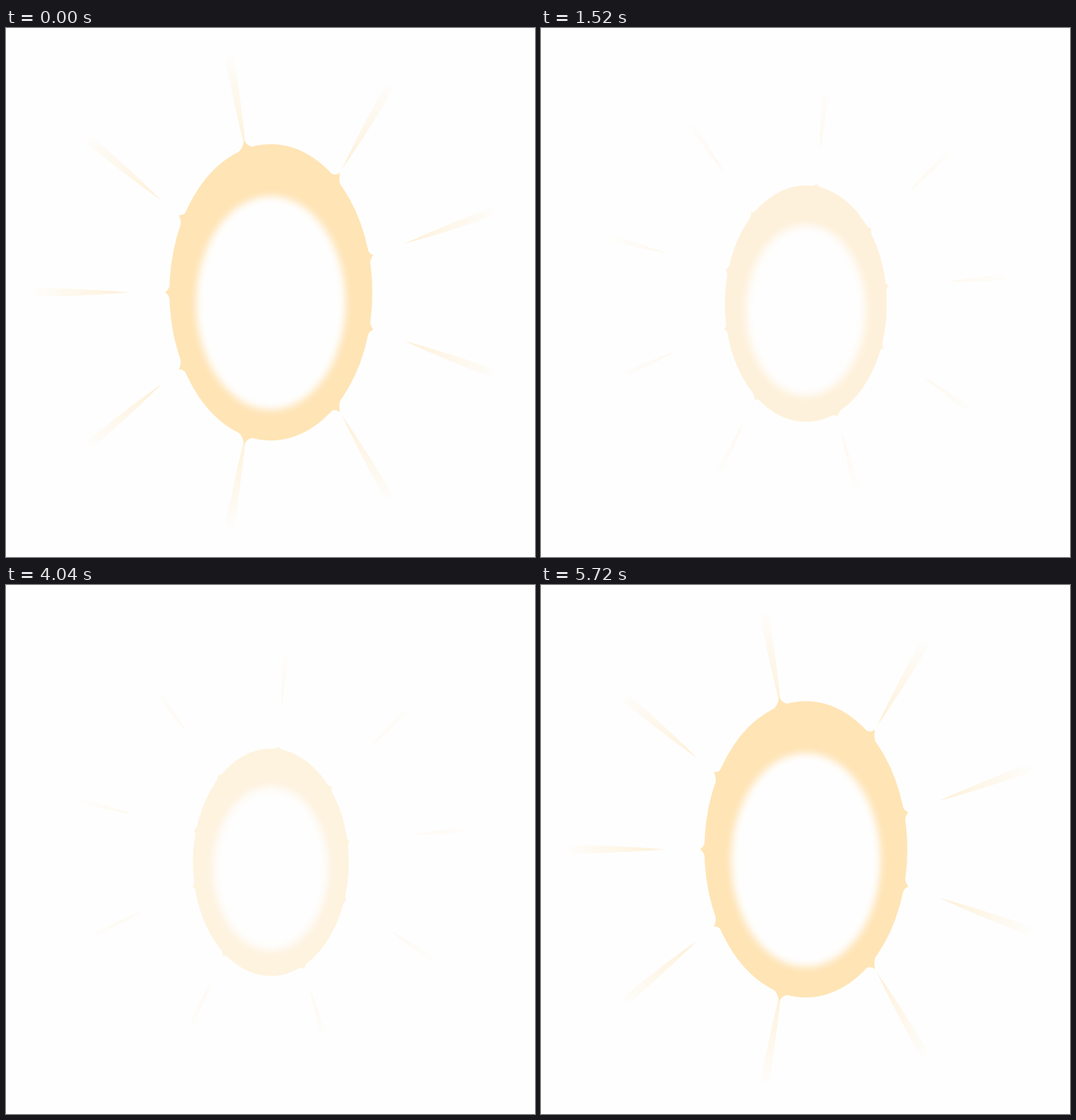
Animation, 748 px wide and 748 px high, one loop 5.76 s. Source, as an HTML page with a canvas:

```html
<!DOCTYPE html>
<html lang="en">
<head>
<meta charset="utf-8">
<title>Pulsing sun</title>
<style>
  html, body { margin: 0; width: 100%; height: 100%; overflow: hidden; background: #fefefe; }
  canvas { display: block; }
</style>
</head>
<body>
<canvas id="sun" width="748" height="748"></canvas>
<script>
const canvas = document.getElementById('sun');
const ctx = canvas.getContext('2d');

const STEP_MS = 40, LOOP_MS = 5760, LAST_STEP = 143;
const HOLD_START = 56, HOLD_END = 88;
const CX = 374.5, CY = 373.8, RAYS = 9;
const COLOR = '#ffe4b5';
const fade = alpha => `rgba(255, 228, 181, ${alpha})`;

function drawRay(angle, shrink) {
  const inner = 201 + 5 * shrink;
  const outer = 342 - 95 * shrink;
  const half = 5.5 - 3.4 * shrink;
  const bend = inner + 0.45 * (outer - inner);
  const gradient = ctx.createLinearGradient(inner, 0, outer, 0);
  [[0, 0.6], [0.25, 0.38], [0.6, 0.22], [0.85, 0.1], [1, 0]]
    .forEach(([at, alpha]) => gradient.addColorStop(at, fade(alpha)));

  ctx.save();
  ctx.translate(CX, CY);
  ctx.rotate(angle);
  ctx.beginPath();
  ctx.moveTo(inner, 0);
  ctx.quadraticCurveTo(bend, half, outer, half * 1.1);
  ctx.lineTo(outer, -half * 1.1);
  ctx.quadraticCurveTo(bend, -half, inner, 0);
  ctx.fillStyle = gradient;
  ctx.fill();
  ctx.restore();
}

// Distance from the ray centre to the ring's edge along a direction.
function edgeDistance(ux, uy, ring) {
  const dy = CY - ring.y;
  const a = (ux / ring.rx) ** 2 + (uy / ring.ry) ** 2;
  const b = uy * dy / ring.ry ** 2;
  const c = (dy / ring.ry) ** 2 - 1;
  return (-b + Math.sqrt(b * b - a * c)) / a;
}

// Pointed swelling where the ring is pulled towards a ray.
function drawBump(angle, shrink, ring) {
  const ux = Math.cos(angle), uy = Math.sin(angle);
  const edge = edgeDistance(ux, uy, ring);
  const x = CX + ux * edge, y = CY + uy * edge;

  let nx = (x - ring.x) / ring.rx ** 2, ny = (y - ring.y) / ring.ry ** 2;
  const length = Math.hypot(nx, ny);
  nx /= length;
  ny /= length;

  const closeness = Math.min(1, Math.max(0, 1 - (201 - edge) / 50));
  const height = (6 + 6.5 * closeness) * (1 - 0.7 * shrink);
  const base = 15 * (1 - 0.4 * shrink);
  const point = (along, out) => [x - ny * along + nx * out, y + nx * along + ny * out];
  const tip = [x + ux * height, y + uy * height];

  ctx.beginPath();
  ctx.moveTo(...point(-base, -2));
  ctx.quadraticCurveTo(...point(-base * 0.25, 0), ...tip);
  ctx.quadraticCurveTo(...point(base * 0.25, 0), ...point(base, -2));
  ctx.closePath();
  ctx.fill();
}

function fillEllipse(x, y, rx, ry) {
  ctx.beginPath();
  ctx.ellipse(x, y, rx, ry, 0, 0, 2 * Math.PI);
  ctx.fill();
}

function draw(step) {
  const turn = 2 * Math.PI * step / LAST_STEP;
  const shrink = (1 - Math.cos(turn)) / 2;
  const scale = 1 - 0.376 * shrink + 0.017 * shrink ** 2;
  const ring = { x: CX, y: CY + 79 * (1 - scale), rx: 143.5 * scale, ry: 209.5 * scale };
  const angles = Array.from({ length: RAYS }, (_, i) => turn + Math.PI + i * 2 * Math.PI / RAYS);

  canvas.style.opacity = Math.abs(1 - 2 * step / LAST_STEP);
  ctx.clearRect(0, 0, canvas.width, canvas.height);
  angles.forEach(angle => drawRay(angle, shrink));

  ctx.fillStyle = COLOR;
  fillEllipse(ring.x, ring.y, ring.rx, ring.ry);
  angles.forEach(angle => drawBump(angle, shrink, ring));

  ctx.save();
  ctx.filter = 'blur(5.5px)';
  ctx.fillStyle = '#fefefe';
  fillEllipse(ring.x, ring.y + 15 * scale ** 2, 105.5 * scale, 151 * scale);
  ctx.restore();
}

function tick(now) {
  let step = Math.floor(now % LOOP_MS / STEP_MS);
  if (step >= HOLD_START && step < HOLD_END) step = HOLD_START;
  draw(step);
  requestAnimationFrame(tick);
}
requestAnimationFrame(tick);
</script>
</body>
</html>
```
